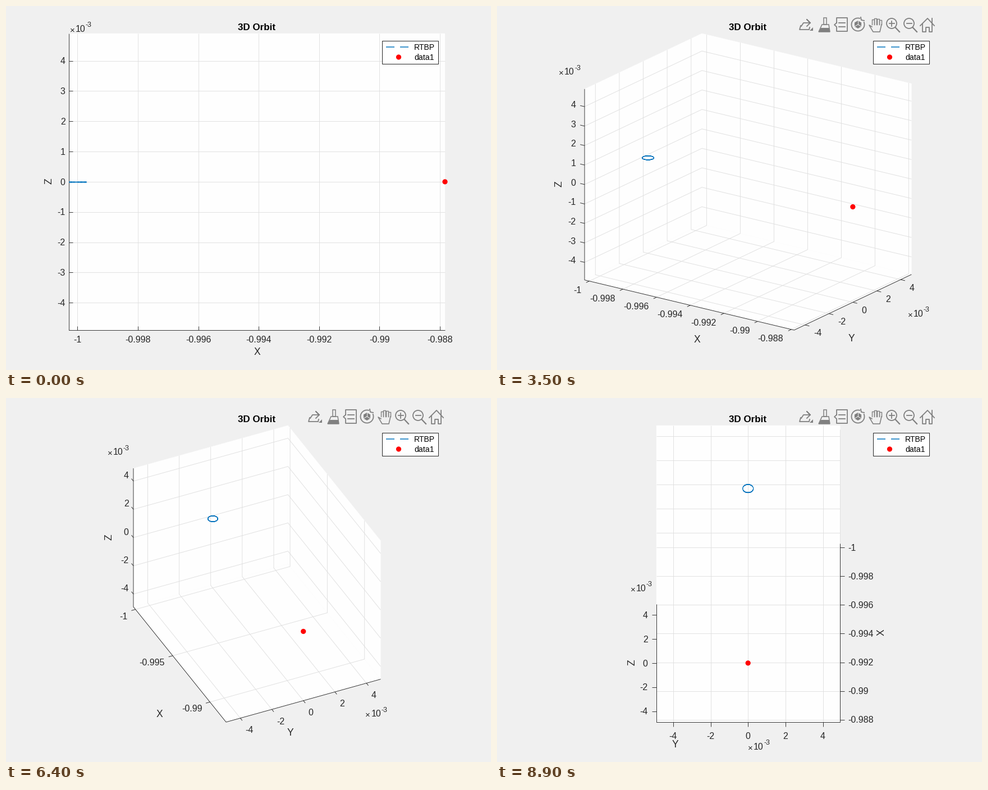
Recreate the animation shown at these times as a matplotlib script. Size 864 by 648 pixels, loop 9000 ms.

```python
import numpy as np
import matplotlib.pyplot as plt
from matplotlib.animation import FuncAnimation
from matplotlib.collections import LineCollection
from matplotlib.patches import Arc, Circle, Polygon, Rectangle

plt.rcParams.update({"font.family": "Liberation Sans",
                     "path.simplify": False,
                     "lines.scale_dashes": False})

W, H, N = 864, 648, 90
INK, BLUE, GRAY, BG = "#262626", "#0072BD", "#808080", "#f0f0f0"
X0, X1, L = -1.000279, -0.987833, 0.004904   # x in [X0, X1], y and z in [-L, L]
XM = (X0 + X1) / 2
CX, CY, BOX_W, BOX_H = 447.2, 312.9, 669.6, 528.1
R = 0.000284                                  # orbit radius
TICK = 0.00026                                # tick length in data units
DASH = (0, (15, 10))

fig = plt.figure(figsize=(W / 72, H / 72), dpi=72, facecolor=BG)
ax = fig.add_axes([0, 0, 1, 1])
ax.set_xlim(0, W)
ax.set_ylim(H, 0)
ax.axis("off")

dynamic, icons = [], []


def put(x, y, s, size=16, ha="left", color=INK, **kw):
    """Text whose cap height is centred on y."""
    return ax.text(x, y + 0.358 * size, s, fontsize=size, ha=ha,
                   va="baseline", color=color, **kw)


def label(*args, **kw):
    dynamic.append(put(*args, **kw))


def name(x, y, s, rotation=0):
    dynamic.append(ax.text(x, y, s, fontsize=17.5, rotation=rotation, color=INK,
                           ha="center", va="center_baseline"))


def exponent(x, y):
    """The x10^-3 factor, starting at x."""
    label(x, y + 2, "\u00d7", size=15)
    label(x + 10, y, "10")
    label(x + 28, y - 7, "-3", size=12.5)


def lines(segs, color, z):
    dynamic.append(ax.add_collection(
        LineCollection(segs, colors=color, linewidths=0.9, zorder=z)))


def dot(x, y, z):
    return ax.add_patch(Circle((x, y), 4.6, fc="red", ec="none", zorder=z))


# Toolbar

def stroke(*pts, lw=1.8, color=GRAY):
    icons.extend(ax.plot(*zip(*pts), color=color, lw=lw, zorder=8,
                         solid_joinstyle="round"))


def shape(patch):
    patch.set_zorder(8)
    icons.append(ax.add_patch(patch))


def build_toolbar():
    # export
    stroke((541, 35), (539, 42), (556, 42), (557, 38))
    stroke((542, 36), (546, 30), (558, 30), (552, 24), (558, 30), (552, 36))
    shape(Polygon([(557, 44), (563, 44), (563, 38)], fc=GRAY))
    # brush
    shape(Rectangle((582, 21), 5, 12, fill=False, ec=GRAY, lw=1.5))
    shape(Polygon([(579, 33), (591, 33), (593, 46), (573, 46)], fill=False,
                  ec=GRAY, lw=1.5))
    shape(Polygon([(577, 39), (592, 39), (593, 46), (573, 46)], fc=GRAY))
    # data tip
    stroke((605, 30), (605, 21), (624, 21), (624, 45), (605, 45), (605, 37),
           (601, 33.5), (605, 30))
    for y in (30, 37):
        stroke((609, y), (620, y))
    # rotate
    shape(Arc((643, 33), 23, 23, theta1=-25, theta2=290, ec=GRAY, lw=1.8))
    stroke((648, 20), (649, 25), (654, 26))
    hexagon = [(643 + 7 * np.cos(a), 33 + 7 * np.sin(a))
               for a in np.radians(np.arange(30, 390, 60))]
    shape(Polygon(hexagon, fc=GRAY))
    for corner in hexagon[::2][::-1]:
        stroke((643, 33), corner, lw=1, color=BG)
    # pan
    for i in range(4):
        x, tip = 668 + 4.3 * i, 22 + 1.3 * abs(i - 1.3) ** 1.6
        stroke((x, 33), (x, tip), (x + 4, tip), (x + 4, 33), lw=1.4)
    stroke((668, 37), (663, 34), (670, 46), (682, 46), (685, 33), lw=1.6)
    # zoom in, zoom out
    for x in (703, 734):
        shape(Circle((x, 31), 9, fill=False, ec=GRAY, lw=1.8))
        stroke((x + 6.5, 38), (x + 14, 46), lw=2.2)
        stroke((x - 4.5, 31), (x + 4.5, 31))
    stroke((703, 26.5), (703, 35.5))
    # home
    stroke((754, 35), (767, 22), (779, 35))
    stroke((758, 32), (758, 46), (764, 46), (764, 38), (770, 38), (770, 46),
           (775, 46), (775, 22))


def build_legend():
    ax.add_patch(Rectangle((670.1, 61.9), 100, 41, fc="white", ec=INK, lw=1, zorder=8))
    ax.plot([677, 717.5], [72.9, 72.9], color=BLUE, lw=1.5, ls=DASH,
            dash_capstyle="butt", zorder=9)
    dot(699.5, 91, 9)
    put(727, 73, "RTBP", size=14, color="black", zorder=9)
    put(727, 91, "data1", size=14, color="black", zorder=9)


build_toolbar()
build_legend()
put(447, 36.5, "3D Orbit", size=17, ha="center", weight="bold", color="black", zorder=9)


# Axes

def camera(k):
    """Orthographic view turning to azimuth 90 and elevation 50, scaled to fit."""
    az, el = np.radians(90 * k / (N - 1)), np.radians(50 * k / (N - 1))
    ca, sa, ce, se = np.cos(az), np.sin(az), np.cos(el), np.sin(el)
    dx, d = X1 - X0, 2 * L
    s = min(BOX_W / (dx * ca + d * sa),
            BOX_H / (d * ce + (dx * sa + d * ca) * se))

    def proj(x, y, z):
        x = x - XM
        return np.stack(np.broadcast_arrays(
            CX + s * (x * ca + y * sa),
            CY - s * (z * ce + se * (y * ca - x * sa))), axis=-1)
    return proj


def ticks(lo, hi, step):
    return np.arange(np.ceil(lo / step), np.floor(hi / step) + 1) * step


def milli(v):
    return f"{v * 1e3:.0f}"


def plain(v):
    return f"{v:.3g}"


def tick_row(values, point, step, gap, fmt, ha, shift=(0, 0)):
    """Label each tick past its end; return the tick segments."""
    step = np.asarray(step, float)
    out = step / max(np.hypot(*step), 1e-9)
    segs = []
    for v in values:
        p = point(v)
        q = p + step + gap * out + shift
        segs.append([p, p + step])
        label(*q, fmt(v), ha=ha)
    return segs


def panes_and_grid(P, xt, yt, zt):
    walls = [[(X0, -L, -L), (X1, -L, -L), (X1, L, -L), (X0, L, -L)],
             [(X0, L, -L), (X1, L, -L), (X1, L, L), (X0, L, L)],
             [(X0, -L, -L), (X0, L, -L), (X0, L, L), (X0, -L, L)]]
    for w in walls:
        dynamic.append(ax.add_patch(Polygon([P(*p) for p in w], fc="#fefefe",
                                            ec="#fefefe", lw=0.4, zorder=1)))
    grid = [[P(x, -L, -L), P(x, L, -L), P(x, L, L)] for x in xt]
    grid += [[P(X1, y, -L), P(X0, y, -L), P(X0, y, L)] for y in yt]
    grid += [[P(X0, -L, z), P(X0, L, z), P(X1, L, z)] for z in zt]
    lines(grid, "#dfdfdf", 2)


def front_view(P, xt, zt):
    segs = [[P(X0, 0, L), P(X0, 0, -L), P(X1, 0, -L)]]
    segs += tick_row(xt, lambda x: P(x, 0, -L), (0, -6.7), -23.5, plain, "center")
    segs += tick_row(zt, lambda z: P(X0, 0, z), (6.7, 0), -13.5, milli, "right")
    lines(segs, INK, 3)
    name(447, 614.5, "X")
    name(77.5, 313, "Z", 90)
    exponent(114, 40)


def end_view(P, xt, yt, zt):
    segs = [[P(X1, -L, L), P(X1, -L, -L), P(X1, L, -L), P(X0, L, -L)]]
    segs += tick_row(xt, lambda x: P(x, L, -L), (8, 0), 7, plain, "left")
    segs += tick_row(yt, lambda y: P(X1, y, -L), (0, 8), 16.5, milli, "center")
    segs += tick_row(zt, lambda z: P(X1, -L, z), (-8, 0), 7, milli, "right")
    lines(segs, INK, 3)
    name(685, 418, "X", 90)
    name(240.5, 472, "Z", 90)
    name(317.5, 615.5, "Y")
    exponent(238, 338)
    exponent(447, 620)


def tilted_view(P, k, xt, yt, zt):
    c = P(X1, -L, -L)
    ux = (c - P(X0, -L, -L)) / (X1 - X0) * TICK
    uy = (P(X1, L, -L) - c) / (2 * L) * TICK
    segs = [[P(X0, -L, L), P(X0, -L, -L), c, P(X1, L, -L)]]
    segs += tick_row(xt, lambda x: P(x, -L, -L), -uy, 8, plain, "right",
                     (0.08 * k - 4, 12.5 - 0.08 * k))
    segs += tick_row(yt, lambda y: P(X1, y, -L), ux, 8, milli, "left", (0, 10))
    segs += tick_row(zt, lambda z: P(X0, -L, z), -ux, 8, milli, "right")
    lines(segs, INK, 3)

    # axis names and factors drift smoothly around their axes
    kk = k * k
    name(*P(XM, -L, -L) + (84 - 2.15 * k + 0.0043 * kk, 43 + 0.27 * k + 0.0065 * kk), "X")
    name(*P(X1, 0, -L) + (40 - 1.5 * k + 0.008 * kk, 54.7 + 0.5 * k - 0.0075 * kk), "Y")
    name(*P(X0, -L, 0) + (0.08 * k - 48, 0), "Z", 90)
    exponent(*P(X0, -L, L) + (-46, 0.07 * k - 34))
    exponent(*P(X1, L, -L) + (42 - 1.75 * k + 0.0105 * kk, 61 + 0.5 * k - 0.0078 * kk))


def draw(k):
    while dynamic:
        dynamic.pop().remove()
    for icon in icons:
        icon.set_visible(k > 0)

    P = camera(k)
    xt = ticks(X0, X1, 0.005 if 56 <= k < 70 else 0.002)
    yt = ticks(-L, L, 0.005 if k < 12 else 0.002)
    zt = ticks(-L, L, 0.001 if k < 56 else 0.002)
    panes_and_grid(P, xt, yt if k else [], zt)
    if k == 0:
        front_view(P, xt, zt)
    elif k == N - 1:
        end_view(P, xt, yt, zt)
    else:
        tilted_view(P, k, xt, yt, zt)

    # five laps, so the dashes overlap and mostly close the ring
    t = np.linspace(0, 10 * np.pi, 400)
    orbit = P(X0 + R + R * np.cos(t), R * np.sin(t), 0)
    dynamic.extend(ax.plot(*orbit.T, color=BLUE, lw=1.2, ls=DASH,
                           dash_capstyle="butt", zorder=4))
    dynamic.append(dot(*P(X1, 0, 0), 5))
    return dynamic


anim = FuncAnimation(fig, draw, frames=N, interval=100, init_func=lambda: [],
                     repeat=True, repeat_delay=0, blit=False,
                     cache_frame_data=False)
plt.show()
```
